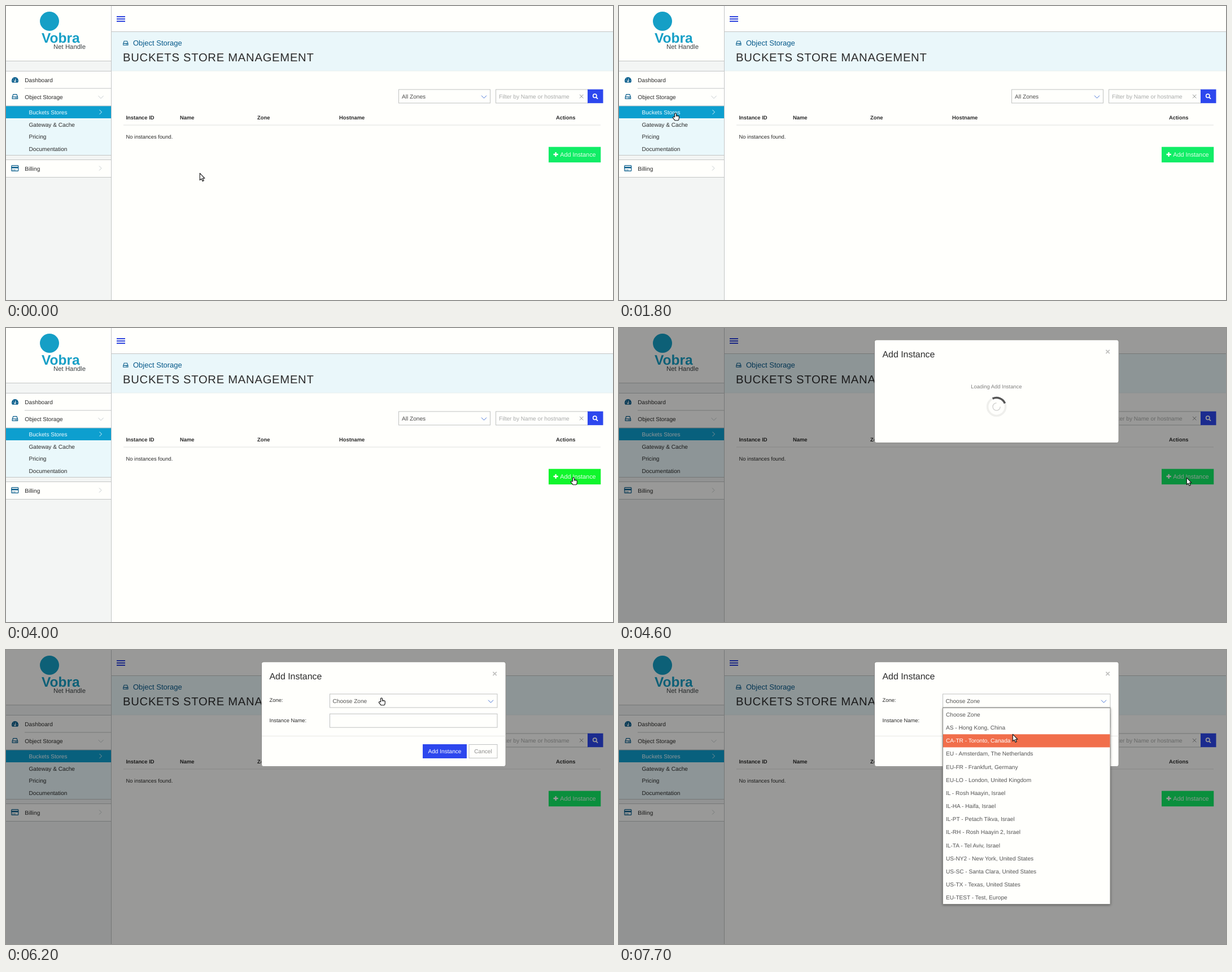
Recreate the animation shown at these times as an HTML page. Size 1075 px wide and 521 px high, loop 8000 ms.

```html
<!DOCTYPE html>
<html lang="en">
<head>
<meta charset="utf-8">
<title>Buckets store</title>
<style>
  html, body { margin: 0; width: 100%; height: 100%; overflow: hidden; background: #fffffc; }
  svg { display: block; width: 100vw; height: 100vh; }
  text { font-family: "Liberation Sans", Arial, sans-serif; font-size: 10.12px; fill: #2b2b2b;
    text-rendering: geometricPrecision; white-space: pre; }
  .small { font-size: 9.4px; }
  .bold { font-weight: bold; }
  .mid { text-anchor: middle; }
  .line { stroke: #c3c5c5; fill: none; }
  .box { fill: #fffffc; stroke: #bfc1c1; }
  .thin { fill: none; stroke-width: 1; }
  .icon { fill: none; stroke: #0b5f8d; stroke-width: 1.2; }
</style>
</head>
<body>
<svg id="stage" viewBox="0 0 1075 521" preserveAspectRatio="none">
  <defs>
    <g id="disk" class="icon">
      <path d="M.6 5.2 2.3 .6H8.3L10 5.2V8.4H.6Z M.6 5.2H10"/>
      <path d="M6 6.9H8.6" stroke-width="1"/>
    </g>
    <path id="down" class="thin" d="M-4.5 -2.3 0 2.3 4.5 -2.3"/>
    <path id="right" class="thin" d="M-2 -4 2 0 -2 4"/>
  </defs>

  <rect width="1075" height="521" fill="#fffffc"/>

  <!-- sidebar -->
  <rect width="186" height="521" fill="#f3f5f4"/>
  <rect width="186" height="97" fill="#fffffc"/>
  <rect y="115" width="186" height="62" fill="#fffffc"/>
  <rect id="rowHover" y="146" width="186" height="31" fill="#e3e5e2"/>
  <rect y="177" width="186" height="87" fill="#eaf8fb"/>
  <rect y="177" width="186" height="22" fill="#0d9fcf"/>
  <rect y="272" width="186" height="31" fill="#fffffc"/>
  <path class="line" d="M0 97.5H186M0 115.5H186M33 146H186M0 177H186M0 264.5H186M0 272.5H186M0 303.5H186M186.5 0V521"/>
  <circle cx="77" cy="27" r="17" fill="#159fc6"/>
  <text class="bold" x="63" y="65" style="font-size:24.5px;fill:#159fc6">Vobra</text>
  <text x="84" y="75.5" style="font-size:11.4px;fill:#3c4245">Net Handle</text>
  <path d="M10 132.5A6 6.6 0 0 1 22 132.5Q22 134.5 21 135.8H11Q10 134.5 10 132.5Z" fill="#0b5f8d"/>
  <path d="M16 133.5 17.3 128.5M12 132.5h1M13.2 129.4h1M19 132.5h1" stroke="#fffffc" fill="none"/>
  <circle cx="16" cy="133.4" r="1.4" fill="#fffffc"/>
  <use href="#disk" x="10.6" y="156"/>
  <rect class="icon" x="9.8" y="282.6" width="12" height="9.8" rx="1"/>
  <path d="M9.5 286.2H22" stroke="#0b5f8d" stroke-width="2.6"/>
  <path d="M11.5 290.4h1.8M14.3 290.4h2.4" stroke="#0b5f8d"/>
  <use href="#down" x="168" y="161.5" stroke="#c5cbcd"/>
  <use href="#right" x="167.5" y="188" stroke="#d6f1fa"/>
  <use href="#right" x="167" y="287.5" stroke="#c5cbcd"/>
  <g id="menu"></g>

  <!-- page header -->
  <rect x="187" y="45" width="888" height="70" fill="#eaf7fa"/>
  <path class="line" d="M187 45.5H1075"/>
  <path d="M187 115H1075" stroke="#e6eeee"/>
  <path d="M196 19H211M196 23H211M196 27H211" stroke="#2d43dd" stroke-width="2"/>
  <use href="#disk" transform="translate(207.2 61.8) scale(.88)"/>
  <text x="225" y="69.7" style="font-size:13.02px;fill:#06598a">Object Storage</text>
  <text x="207" y="98" style="font-size:20.24px;letter-spacing:.723px">BUCKETS STORE MANAGEMENT</text>

  <!-- filters and table -->
  <rect class="box" x="695.5" y="148" width="162" height="24"/>
  <text x="701" y="163.6" fill="#555" style="fill:#4c4c4c">All Zones</text>
  <use href="#down" x="846.5" y="161" stroke="#4774d8"/>
  <rect class="box" x="867.5" y="148" width="163" height="24"/>
  <text x="873" y="163.6" style="fill:#a9abab">Filter by Name or hostname</text>
  <path d="M1016 157 1022.4 163.4M1022.4 157 1016 163.4" stroke="#8e9292"/>
  <rect x="1030" y="147.7" width="27.5" height="24.5" fill="#2d47ee"/>
  <g fill="none" stroke="#fff" stroke-width="1.6">
    <circle cx="1042.8" cy="159.3" r="3.2"/>
    <path d="M1045 161.6 1048 164.6" stroke-width="2"/>
  </g>
  <g id="heads"></g>
  <path d="M208 211H1053" stroke="#dfe1df"/>
  <text class="small" x="212.5" y="235.3">No instances found.</text>
  <rect id="add" x="961" y="249.7" width="92.3" height="27.5"/>
  <path d="M969.5 263H977.8M973.6 258.9V267.1" stroke="#fff" stroke-width="2.3"/>
  <text x="981.3" y="267" style="font-size:10.85px;fill:#e4ffec">Add Instance</text>

  <!-- dialog -->
  <g id="dialog">
    <rect width="1075" height="521" opacity=".4"/>
    <rect id="panel" x="452.5" y="21" width="432.6" rx="3.5" fill="#fffffc" stroke="#8a8a87"/>
    <text x="466.5" y="52.3" style="font-size:15.9px">Add Instance</text>
    <path d="M862.4 38.8 868.8 45.2M868.8 38.8 862.4 45.2" stroke="#c2c2c0" stroke-width="1.8"/>
    <g id="loading">
      <text class="small mid" x="668.4" y="107.3" style="fill:#808080">Loading Add Instance</text>
      <g transform="translate(668.6 139.5)" fill="none">
        <circle r="16" stroke="#efefec" stroke-width="3.6"/>
        <path id="outer" d="M-7 -14.4A16 16 0 0 1 14.8 -6" stroke="#555" stroke-width="3.6"/>
        <path id="inner" d="M0 -6.6A6.6 6.6 0 1 0 6.6 0" stroke="#d0d0ce" stroke-width="1.4"/>
      </g>
    </g>
    <g id="form">
      <text class="small" x="466.5" y="92.3">Zone:</text>
      <text class="small" x="466.5" y="127.7">Instance Name:</text>
      <rect class="box" x="573.5" y="78" width="296.5" height="24"/>
      <rect class="box" x="573.5" y="113.2" width="296.5" height="24"/>
      <text x="578.5" y="93.6" style="fill:#555">Choose Zone</text>
      <use href="#down" x="858.5" y="91" stroke="#4774d8"/>
      <path d="M453 152.5H885" stroke="#e8e8e5"/>
      <rect x="738" y="167" width="78" height="25" fill="#2d47ee"/>
      <text class="mid" x="777" y="183.2" style="fill:#fff">Add Instance</text>
      <rect class="box" x="820" y="167.5" width="50" height="24"/>
      <text class="mid" x="845" y="183.2" style="fill:#8d8d8d">Cancel</text>
    </g>
    <g id="list">
      <rect x="573.5" y="102.5" width="296.5" height="348" fill="#fffffc" stroke="#8b8b88"
        style="filter:drop-shadow(0 1px 2px rgba(0,0,0,.4))"/>
      <rect id="mark" x="574" width="295.5" height="23.15" fill="#f16e4b"/>
      <g id="zones"></g>
    </g>
  </g>

  <g id="cursor" stroke-linejoin="round">
    <path id="arrow" d="M.3 .3V12.6L3.1 10.1 5.1 14.5 7.2 13.5 5.2 9.3H9Z" fill="#fff" stroke="#111" stroke-width="1.1"/>
    <g id="hand" stroke="#111" stroke-width="1.1">
      <path d="M-1.4 7V.9Q0 -.9 1.4 .9V4.2Q4 3.8 6.3 5.6V9Q6 12.5 4.6 12.7H-1L-4.6 8.2Q-4.4 6 -2.6 6.6Z" fill="#fff"/>
      <path d="M1.4 4.2V6.4M3.8 4.5V6.6" fill="none" stroke-width=".8"/>
    </g>
  </g>
</svg>
<script>
const LOOP = 8000, STEP = 100, ROW = 23.15, LIST_TOP = 103;
const el = {};
document.querySelectorAll('#stage [id]').forEach(n => el[n.id] = n);

// Texts that repeat in columns or rows
const label = (x, y, s, css = '', cls = '') => `<text class="${cls}" x="${x}" y="${y}" style="${css}">${s}</text>`;

el.menu.innerHTML =
  label(33.3, 134.6, 'Dashboard') + label(33.3, 165, 'Object Storage') + label(33.3, 291.6, 'Billing') +
  ['Buckets Stores', 'Gateway &amp; Cache', 'Pricing', 'Documentation']
    .map((s, i) => label(40.5, 191.8 + 21.7 * i, s, i ? '' : 'fill:#f4fcff')).join('');

el.heads.innerHTML = Object.entries({ 'Instance ID': 212.5, Name: 308, Zone: 445, Hostname: 590, Actions: 974 })
  .map(([s, x]) => label(x, 200.8, s, '', 'small bold')).join('');

el.zones.innerHTML = ['Choose Zone', 'AS - Hong Kong, China', 'CA-TR - Toronto, Canada',
  'EU - Amsterdam, The Netherlands', 'EU-FR - Frankfurt, Germany', 'EU-LO - London, United Kingdom',
  'IL - Rosh Haayin, Israel', 'IL-HA - Haifa, Israel', 'IL-PT - Petach Tikva, Israel',
  'IL-RH - Rosh Haayin 2, Israel', 'IL-TA - Tel Aviv, Israel', 'US-NY2 - New York, United States',
  'US-SC - Santa Clara, United States', 'US-TX - Texas, United States', 'EU-TEST - Test, Europe']
  .map((s, i) => label(579, 118 + ROW * i, s, 'fill:#555')).join('');
const zoneTexts = [...el.zones.children];

// Pointer route: time, x, y
const route = [
  [600, 343, 296], [1200, 79, 151], [1500, 81, 178], [1800, 100, 190],
  [2700, 100, 190], [3000, 733, 273], [3100, 733, 273], [4000, 1005, 265],
  [5200, 1005, 265], [5900, 667, 76], [6000, 664, 84], [6100, 664, 84],
  [6200, 665, 85], [7000, 665, 85], [7700, 697, 149]
];

function pointer(t) {
  const next = route.findIndex(k => k[0] > t);
  if (next === 0) return route[0].slice(1);
  if (next < 0) return route[route.length - 1].slice(1);
  const [t0, x0, y0] = route[next - 1], [t1, x1, y1] = route[next];
  const u = (t - t0) / (t1 - t0), e = u * u * (3 - 2 * u);
  return [x0 + (x1 - x0) * e, y0 + (y1 - y0) * e];
}

const show = (node, on) => node.setAttribute('display', on ? 'inline' : 'none');

function draw(t) {
  const [x, y] = pointer(t);
  const inside = (l, top, r, b) => x >= l && x <= r && y >= top && y <= b;
  const open = t >= 4600, ready = t >= 5000, listed = t >= 6500;
  const onMenu = t < 2600 && inside(0, 115, 186, 264);
  const onAdd = !open && inside(961, 250, 1053, 277);
  const onZone = ready && !listed && inside(573, 78, 870, 102);
  const hand = onMenu || onAdd || onZone;

  el.cursor.setAttribute('transform', `translate(${x} ${y})`);
  show(el.hand, hand);
  show(el.arrow, !hand);
  show(el.rowHover, onMenu && inside(0, 146, 186, 177));
  el.add.setAttribute('fill', onAdd ? '#10f62c' : '#11ed66');

  show(el.dialog, open);
  show(el.loading, !ready);
  show(el.form, ready);
  show(el.list, listed);
  el.panel.setAttribute('height', ready ? 185.5 : 182.5);

  const turn = .36 * Math.max(0, Math.min(t, 4800) - 4600);
  el.outer.setAttribute('transform', `rotate(${turn})`);
  el.inner.setAttribute('transform', `rotate(${-turn})`);

  const row = Math.max(0, Math.floor((y + 1 - LIST_TOP) / ROW));
  el.mark.setAttribute('y', LIST_TOP + ROW * row);
  zoneTexts.forEach((n, i) => n.style.fill = i === row ? '#fff' : '#555');
}

function tick() {
  draw(Math.floor(performance.now() % LOOP / STEP) * STEP);
  requestAnimationFrame(tick);
}
tick();
</script>
</body>
</html>
```
